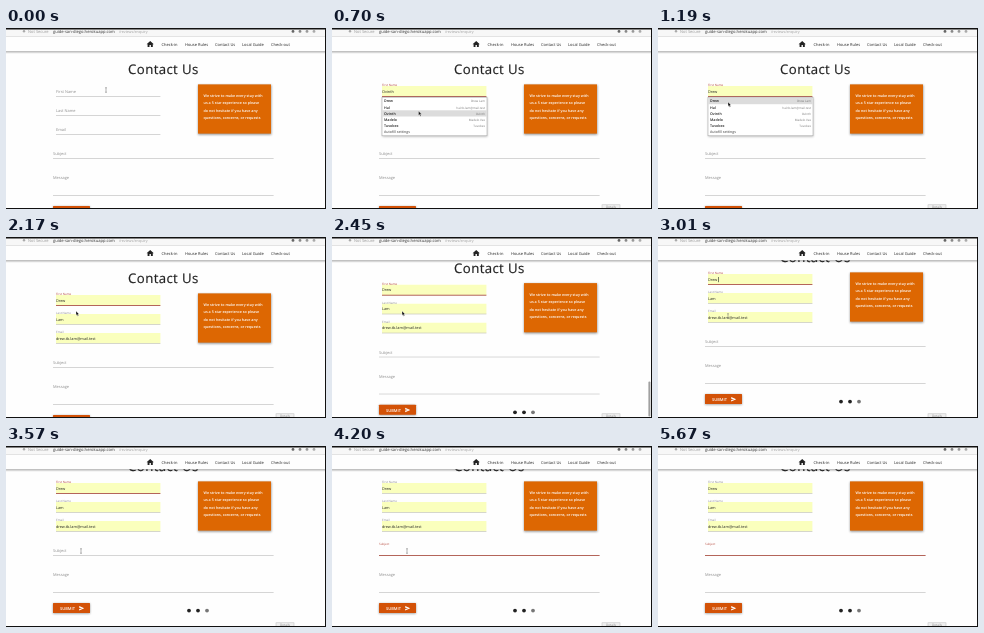
An HTML page that plays this animation: 320x181 px, repeating every 5740 ms.

```html
<!DOCTYPE html>
<html lang="en">
<head>
<meta charset="utf-8">
<title>Contact form</title>
<style>
  html, body { margin: 0; width: 100%; height: 100%; overflow: hidden; background: #fff; }
  svg { display: block; width: 100%; height: 100%; }
  text { font-family: "Open Sans", "Noto Sans", sans-serif; text-rendering: geometricPrecision; white-space: pre; }
  .soft { filter: blur(.8px); }
</style>
</head>
<body>
<svg id="stage" viewBox="0 0 320 181"></svg>
<script>
const LOOP = 5740, STEP = 70, SCROLL = 21;
const GREY = '#8c8c8c', RED = '#b5493c', INK = '#222', YELLOW = '#faffbd';
const stage = document.getElementById('stage');

function add(parent, tag, attrs, content) {
  const el = document.createElementNS('http://www.w3.org/2000/svg', tag);
  set(el, attrs);
  if (content !== undefined) el.textContent = content;
  parent.appendChild(el);
  return el;
}
function set(el, attrs) {
  for (const key in attrs) el.setAttribute(key, attrs[key]);
}
const show = (el, on) => set(el, { visibility: on ? 'visible' : 'hidden' });
const group = (parent, attrs = {}) => add(parent, 'g', attrs);
const rect = (parent, x, y, width, height, fill, more = {}) =>
  add(parent, 'rect', { x, y, width, height, fill, ...more });
const shadow = (parent, x, y, width, height, opacity) =>
  rect(parent, x, y, width, height, '#000', { opacity, class: 'soft' });
const text = (parent, x, y, str, size = 3.95, fill = INK, more = {}) =>
  add(parent, 'text', { x, y, 'font-size': size, fill, ...more }, str);
const dot = (parent, cx, cy, r, fill) => add(parent, 'circle', { cx, cy, r, fill });

const clamp = v => Math.min(1, Math.max(0, v));
const span = (t, from, to) => clamp((t - from) / (to - from));
const easeOut = p => 1 - (1 - p) * (1 - p);
const smooth = p => p * p * (3 - 2 * p);
const mix = (a, b, p) => a + (b - a) * p;
const blink = (t, start) => t >= start && Math.floor((t - start) / 630) % 2 === 0;

const suggestions = [
  ['Drew', 'Drew Lam'],
  ['Hal', 'hal.tb.lam@mail.test'],
  ['Ovinth', 'Ovinth'],
  ['Madelo', 'Madelo Vax'],
  ['Tuvobex', 'Tuvobex']
];

// Page
rect(stage, 0, 0, 320, 181, '#fefefe');
const page = group(stage);
text(page, 157.4, 46, 'Contact Us', 13.2, INK, {
  'text-anchor': 'middle', 'letter-spacing': .4, stroke: INK, 'stroke-width': .2, 'stroke-linejoin': 'round'
});

shadow(page, 192, 57, 73.4, 49.8, .4);
rect(page, 192, 56.4, 73, 49.2, '#dd6702');
['We strive to make every stay with', 'us a 5 star experience so please',
 'do not hesitate if you have any', 'questions, concerns, or requests'
].forEach((line, i) => text(page, 197.6, 69 + i * 7.45, line, 3.65, '#fff', { 'font-weight': 600 }));

function field(name, x, base, lineY, width, value) {
  const g = group(page);
  const fill = rect(g, x, lineY - 11, width, 10.4, YELLOW);
  const line = rect(g, x, lineY - 1, width, .6, '#bbb');
  const label = text(g, x, base, name);
  const input = text(g, x, lineY - 4.3, value, 3.8);
  const caret = rect(g, x + .1, lineY - 8, .6, 5.2, INK);
  return {
    input, caret,
    update(lift, focus, filled) {
      set(label, { y: mix(base, lineY - 10.9, lift), 'font-size': mix(3.95, 3, lift), fill: focus ? RED : GREY });
      set(line, { fill: focus ? '#b4655a' : '#bbb', height: focus ? 1 : .6 });
      show(fill, filled);
      show(input, filled);
    }
  };
}
const first = field('First Name', 50, 65.4, 69, 104.4, 'Drew');
const last = field('Last Name', 50, 84.4, 88, 104.4, 'Lam');
const email = field('Email', 50, 103.4, 107, 104.4, 'drew.tb.lam@mail.test');
const subject = field('Subject', 47, 127.4, 131, 220.6, '');
const message = field('Message', 47, 151.4, 168, 220.6, '');
message.update(0, false, false);
show(message.caret, false);
show(last.caret, false);
show(email.caret, false);

shadow(page, 47, 178.6, 37, 10, .4);
rect(page, 47, 178, 37, 10, '#d35207', { rx: .6 });
text(page, 54, 184.9, 'SUBMIT', 4, '#fff', { 'font-weight': 600 });
add(page, 'path', { d: 'M73.2 181l5 2.3-5 2.3v-1.7l3-.6-3-.6z', fill: '#fff' });
['#222', '#222', '#777'].forEach((fill, i) => dot(page, 183 + i * 9, 185.6, 1.9, fill));

// Suggestion list
const list = group(stage);
shadow(list, 50.4, 69.8, 105, 39, .25);
rect(list, 50, 69.2, 105, 38.6, '#fff', { stroke: '#aaa', 'stroke-width': .6 });
const hover = rect(list, 50.3, 70, 104.4, 6.2, '#dcdcdc');
suggestions.forEach(([name, detail], i) => {
  const y = 74.4 + i * 6.15;
  text(list, 52, y, name, 3.6, INK, { 'font-weight': 600 });
  text(list, 153, y, detail, 3, '#777', { 'text-anchor': 'end' });
});
text(list, 52, 105, 'Autofill settings', 3.6, '#333');

// Site navigation and browser bar
shadow(stage, -3, 10, 326, 14, .45);
rect(stage, 0, 8, 320, 15.2, '#fefefe');
add(stage, 'path', { d: 'M144.2 13l3.6 3.2h-1v2.8h-1.9v-2h-1.4v2h-1.9v-2.8h-1z', fill: INK });
[['Check-in', 155.5], ['House Rules', 179], ['Contact Us', 209], ['Local Guide', 236], ['Check-out', 265]]
  .forEach(([name, x]) => text(stage, x, 17.9, name, 4, INK));

rect(stage, 0, 0, 320, 8.4, '#f7f7f7');
rect(stage, 0, 8, 320, .6, '#d4d4d4');
text(stage, 22, 4.6, 'Not Secure', 4, '#999');
text(stage, 47, 4.6, 'guide-san-diego.herokuapp.com', 4.1, '#333');
text(stage, 113, 4.6, '/reviews/enquiry', 3.7, '#a0a0a0');
dot(stage, 18, 3.2, 1.2, '#aaa');
['#666', '#888', '#999', '#aaa'].forEach((fill, i) => dot(stage, 287 + i * 7, 3.4, 1.4, fill));

const tip = group(stage);
rect(tip, 270, 176.8, 18, 5, '#eee', { stroke: '#bbb', 'stroke-width': .5 });
text(tip, 279, 180, 'Details', 3.2, '#888', { 'text-anchor': 'middle' });
const thumb = rect(stage, 316.4, 144.5, 2, 35, '#777', { rx: 1 });

// Dark screen edge
rect(stage, 0, 0, 320, 1.5, '#111');
rect(stage, 319, 0, 1, 181, '#111');
rect(stage, 0, 180, 320, 1, '#111');

// Pointer
const arrow = add(stage, 'path', {
  d: 'M0 0v4.4l1-.9.8 1.7.8-.4-.8-1.6h1.4z', fill: '#111', stroke: '#fff', 'stroke-width': .35
});
const beam = add(stage, 'path', {
  d: 'M-1-2.4q1 0 1 .6 0-.6 1-.6M0-1.8v3.6M-1 2.4q1 0 1-.6 0 .6 1 .6',
  fill: 'none', stroke: '#666', 'stroke-width': .5
});
const route = [
  [0, 100, 62], [490, 100, 62], [770, 84, 87], [1050, 72, 75], [1190, 70, 74],
  [2590, 70, 74], [2800, 70, 79], [3010, 70, 79], [3570, 75, 105], [LOOP, 75, 105]
];
function pointer(t) {
  const i = route.findIndex(stop => stop[0] > t);
  const [t0, x0, y0] = route[i - 1], [t1, x1, y1] = route[i];
  const p = smooth(span(t, t0, t1));
  return [mix(x0, x1, p), mix(y0, y1, p)];
}

function draw(time) {
  const t = Math.floor((time % LOOP) / STEP) * STEP;
  const [x, y] = pointer(t);
  const open = t >= 210 && t < 1540;
  const row = open && y >= 70 ? Math.min(4, Math.floor((y - 70) / 6.15)) : -1;
  const filled = t >= 1540;
  const onSubject = t >= 3640;
  const onFirst = t >= 70 && !onSubject;

  set(page, { transform: `translate(0 ${-SCROLL * easeOut(span(t, 2310, 2800))})` });

  first.update(easeOut(span(t, 0, 280)), onFirst, filled || row >= 0);
  first.input.textContent = suggestions[Math.max(row, 0)][0];
  set(first.caret, { x: filled ? 60.4 : 50.1 });
  show(first.caret, onFirst && blink(t, filled ? 1540 : 70));
  last.update(filled ? 1 : 0, false, filled);
  email.update(filled ? 1 : 0, false, filled);
  subject.update(easeOut(span(t, 3570, 3850)), onSubject, false);
  show(subject.caret, onSubject && blink(t, 3570));

  show(list, open);
  set(hover, { y: 70 + Math.max(row, 0) * 6.15, opacity: row >= 0 ? 1 : 0 });
  show(tip, t >= 210);
  set(thumb, { opacity: t < 2380 ? 0 : .7 * (1 - span(t, 2660, 3010)) });

  const isBeam = t < 490 || t >= 2590;
  show(beam, isBeam && t < 5600);
  show(arrow, !isBeam);
  set(isBeam ? beam : arrow, { transform: `translate(${x} ${y})` });
}

const start = performance.now();
function tick() {
  draw(performance.now() - start);
  requestAnimationFrame(tick);
}
tick();
</script>
</body>
</html>
```
